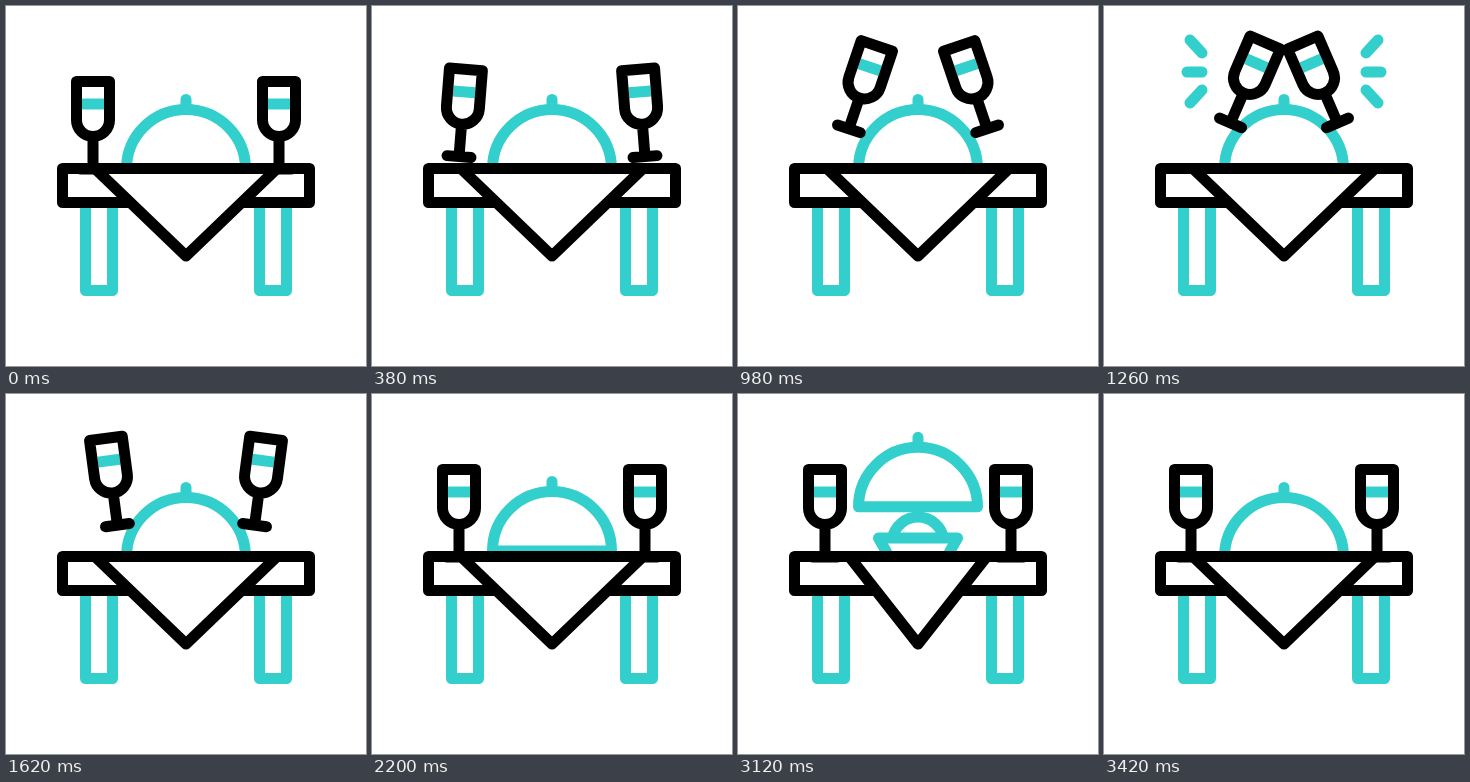
These frames come from a looping animation (360 px wide and 360 px high, 3.6 s). An HTML page:

```html
<!DOCTYPE html>
<html lang="en">
<head>
<meta charset="utf-8">
<title>Dinner toast</title>
<style>
  html, body { margin: 0; height: 100%; overflow: hidden; background: #fff; }
  svg { display: block; width: 100%; height: 100%; }
  .ink { stroke: #000; }
</style>
</head>
<body>
<svg viewBox="0 0 360 360" fill="none" stroke="#33cfcc" stroke-width="11" stroke-linecap="round" stroke-linejoin="round">
  <defs>
    <path id="leg" d="M79.5 190V284.5H106.5V190"/>
    <!-- centred on the middle of the glass -->
    <g id="glass">
      <path d="M-11 -21H11" stroke-linecap="butt"/>
      <path class="ink" d="M-16.5 -43.5H16.5V-5a16.5 16.5 0 0 1 -33 0ZM0 11.5V44M-12 44H12"/>
    </g>
    <path id="rays"/>
  </defs>
  <use href="#leg"/>
  <use href="#leg" transform="matrix(-1 0 0 1 360 0)"/>
  <path d="M154.5 144A26 26 0 0 1 205.5 144M148.500 158L140.500 144H219.500L211.500 158"/>
  <path id="dome" fill="#fff" d="M120.500 163a59.500 59.500 0 0 1 119 0ZM180 103.500V93.500"/>
  <use href="#rays"/>
  <use href="#rays" transform="matrix(-1 0 0 1 360 0)"/>
  <path class="ink" fill="#fff" d="M56.500 162.500H303.500V196.500H56.500Z"/>
  <path id="napkin" class="ink" fill="#fff"/>
  <use id="left" href="#glass"/>
  <g transform="matrix(-1 0 0 1 360 0)"><use id="right" href="#glass"/></g>
</svg>
<script>
const LOOP = 3600;
const byId = id => document.getElementById(id);
const ease = p => (1 - Math.cos(Math.PI * p)) / 2;
const ramp = (t, a, b) => Math.min(1, Math.max(0, (t - a) / (b - a)));
const mix = (a, b, p) => a + (b - a) * p;

// time, centre x, centre y, tilt of the left glass
const toast = [
  [120, 87, 119, 0],
  [720, 95.75, 88.2, 11.4],
  [1180, 144, 76.5, 23.4],
  [1280, 144, 76.5, 23.4],
  [1680, 103.5, 88.1, -9.3],
  [2160, 87, 119, 0]
];

// inner end and outer end of each ray
const rays = [[98, 47, 86, 34], [98, 66, 83, 66], [98, 84, 86, 97]];

function pose(t) {
  let i = 0;
  while (i < toast.length - 2 && t > toast[i + 1][0]) i++;
  const a = toast[i], b = toast[i + 1], p = ease(ramp(t, a[0], b[0]));
  return a.map((v, k) => mix(v, b[k], p));
}

function rayPath(t) {
  const head = ease(ramp(t, 1140, 1240)), tail = ease(ramp(t, 1280, 1400));
  if (head <= tail) return '';
  return rays.map(([x, y, u, v]) =>
    `M${mix(x, u, tail)} ${mix(y, v, tail)}L${mix(x, u, head)} ${mix(y, v, head)}`).join('');
}

function draw(now) {
  const t = now % LOOP;
  const [, x, y, tilt] = pose(t);
  const place = `translate(${x} ${y}) rotate(${tilt})`;
  byId('left').setAttribute('transform', place);
  byId('right').setAttribute('transform', place);
  byId('rays').setAttribute('d', rayPath(t));

  const close = ease(ramp(t, 3000, 3420));
  const lift = ease(ramp(t, 2095, 2620)) - close;
  const half = mix(91, 63.5, ease(ramp(t, 2200, 2620)) - close);
  byId('dome').setAttribute('transform', `translate(0 ${-62 * lift})`);
  byId('napkin').setAttribute('d', `M${180 - half} 162.5H${180 + half}L180 250Z`);
}

const start = performance.now();
function tick() {
  draw(performance.now() - start);
  requestAnimationFrame(tick);
}
tick();
</script>
</body>
</html>
```
